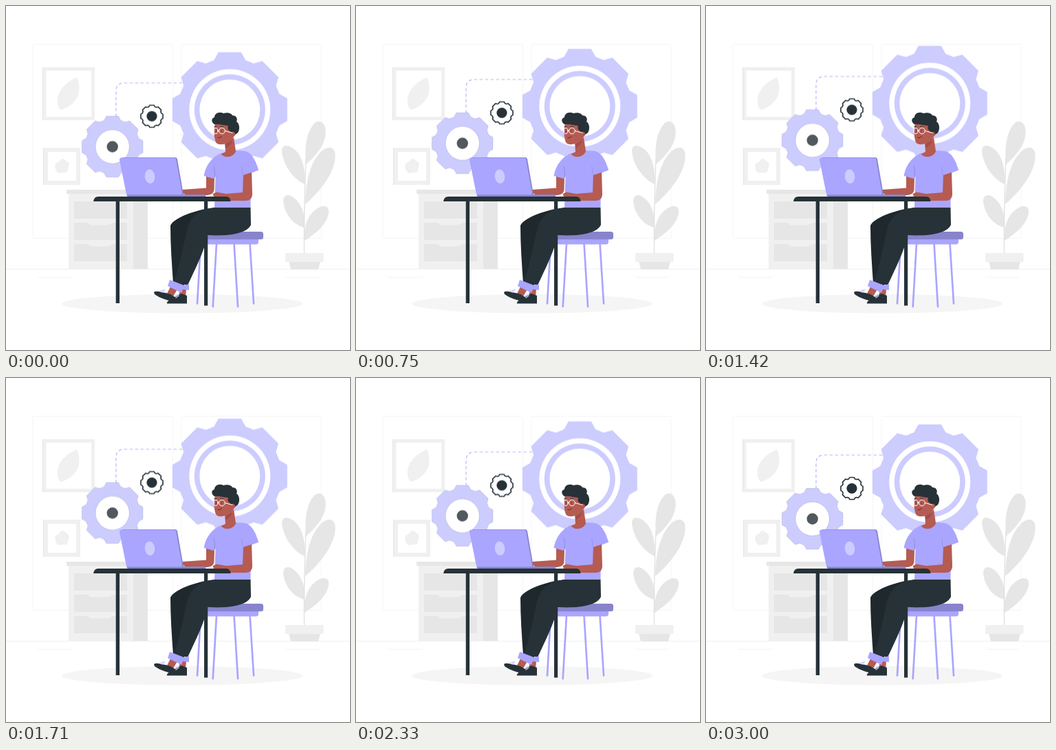
An HTML page that plays this animation: 500x500 px, repeating every 3040 ms.

```html
<!DOCTYPE html>
<html lang="en">
<head>
<meta charset="utf-8">
<title>Working at a desk</title>
<style>
  html, body { margin: 0; width: 100%; height: 100%; overflow: hidden; background: #fff; }
  svg { display: block; width: 100vw; height: 100vh; }
  .main { fill: #aaa5ff; }
  .deep { fill: #8884cc; }
  .pale { fill: #ccccff; }
  .dark { fill: #263238; }
  .skin { fill: #b55b52; }
  .g1 { fill: #f5f5f5; }
  .g2 { fill: #f0f0f0; }
  .g3 { fill: #e6e6e6; }
  .white { fill: #fff; }
  .line { fill: none; stroke-linecap: round; stroke-linejoin: round; }
</style>
</head>
<body>
<svg viewBox="0 0 500 500">
  <!-- room -->
  <g class="line" stroke="#f5f5f5">
    <rect x="39" y="55.5" width="203.5" height="282" rx="2"/>
    <rect x="255" y="55.5" width="203" height="282" rx="2"/>
    <path d="M0 382.5H500" stroke="#ebebeb" stroke-width=".7"/>
    <path d="M47 394.3H96M407 394.3H455" stroke="#efefef" stroke-width=".8"/>
  </g>
  <ellipse class="g1" cx="256" cy="432.7" rx="175" ry="13.8"/>

  <!-- pictures -->
  <path class="g3" d="M53 89H56V166H53ZM54 206H57V260H54Z"/>
  <path class="g2" d="M54 89H129V166H54ZM55 206H108V260H55Z"/>
  <path class="white" d="M58.500 94H124V161H58.500ZM61 212H102V254H61Z"/>
  <path class="g2" d="M103 104C90 109 77 120 75 134C74 142 76 148 80 151C91 148 104 138 106 125C107 117 106 109 103 104Z"/>
  <path class="g2" d="M80 223Q82 221 85 223L90 227Q93 230 91 233L90 239Q88 243 84 242L77 243Q73 241 72 237L71 232Q72 228 76 227Z"/>

  <!-- cabinet -->
  <path class="g2" d="M91 272H185V382H91Z"/>
  <path class="g3" d="M88 267H206V273H88ZM185 272H206V382H185Z"/>
  <g id="drawers" class="g3"></g>

  <!-- plant -->
  <g class="g3">
    <path d="M436 230C434 207 436 184 448 171C453 166 461 166 464 177C468 196 453 216 436 230Z"/>
    <path d="M435 288C435 261 441 230 455 215C463 205 474 202 478 212C482 230 467 261 435 288Z"/>
    <path d="M434 259C418 252 402 231 401 210C402 201 409 202 416 206C430 214 436 238 434 259Z"/>
    <path d="M434 322C419 319 405 304 403 284C403 275 409 273 416 277C429 285 436 304 434 322Z"/>
    <path d="M433 342C432 320 440 300 455 293C463 289 470 291 469 300C467 317 451 330 433 342Z"/>
    <path d="M411 371H457L454 383H414Z"/>
  </g>
  <path class="line" stroke="#e0e0e0" stroke-width="1.300" d="M433.500 359C433 320 434 270 436 222"/>
  <rect class="g2" x="406" y="359" width="55.500" height="13" rx="1"/>

  <!-- floating gears -->
  <g id="gears">
    <path class="line" style="stroke-linecap:butt" stroke="#b9b4f5" stroke-width="1.200" stroke-dasharray="4.500 3.500"
      d="M160 161V124Q160 112 172 112H259"/>
    <g transform="translate(325.300 151)">
      <path class="pale" data-gear="1"/>
      <circle class="white" r="59"/>
      <circle class="pale" r="51.500"/>
      <circle class="white" r="44"/>
    </g>
    <g transform="translate(154.700 204.700)">
      <g stroke="#263238" stroke-opacity=".4" stroke-width=".6" stroke-dasharray="1.500 1.500">
        <path class="pale" data-gear=".531"/>
        <circle class="white" r="24.500"/>
      </g>
      <circle fill="#51595e" r="8.200"/>
    </g>
    <g transform="translate(212 160.500)">
      <path class="white" data-gear=".192" stroke="#263238" stroke-width="1.600" stroke-linejoin="round"/>
      <circle class="dark" r="7.600"/>
    </g>
  </g>

  <!-- stool -->
  <path class="line" stroke="#aaa5ff" stroke-width="2.700" d="M283 345L278 432.500M306 345L300.700 437M331.500 345L337 437M354.500 345L360 432.500"/>
  <path class="main" d="M280 338H367V343Q367 346.500 363 346.500H284Q280 346.500 280 343Z"/>
  <rect class="deep" x="280" y="328" width="94" height="11.300" rx="3.500"/>

  <!-- feet -->
  <path class="skin" d="M239 408L249 412L243 422L234 418ZM253 411L262 412L261 423L251 423Z"/>
  <path class="dark" d="M215 416C218 413 226 416 232 417L239 419L249 425L246 430C235 428 224 425 216 419Z"/>
  <path class="dark" d="M234 431C236 427 243 425 249 421L255 418L263 421V432.500H236Q233 432.500 234 431Z"/>
  <path class="line" stroke="#ccccff" stroke-width="1.300" d="M225 414L229 413M227 416L231 412M246 421L250 419M247 424L251 421"/>

  <!-- trousers -->
  <path fill="#1e282d" d="M303 293C275 296 244 308 239 319C239 347 241 375 243 403L258 408L278 350L312 310Z"/>
  <path class="dark" d="M303 293H355.500L356 318C351 330 326 335 293 333C289 355 275 382 264 406L244 401C252 380 258 346 263 325C266 312 274 303 285 297Z"/>
  <path class="main" d="M238 398L259 406L266 404V413L257 412L255 417L235 407Z"/>

  <!-- torso and arms -->
  <path class="skin" d="M291 247L303 249L302.500 267C302 273 297 275 290 275H263L256 272V267L291 264.500Z"/>
  <path class="main" d="M313 214C301 218 290 231 287.700 247L302.500 251L304.500 247L303 293H355.500L356 243L367 238.500C362 222 356 211 344 210.500L333 210C329 219 319 220 313 214Z"/>
  <path class="skin" d="M345 243L357 240L358 273C358 280 354 283 348 283H322L302 277L300.500 273L306 270.500L320 273L344 271Z"/>
  <path class="line" stroke="#8884cc" stroke-width=".8" d="M303 250C304 241 303 237 302 233M344.500 246L343 234"/>
  <path class="main" d="M343 231L362 225L367 238.500L344.500 246Z"/>

  <!-- head -->
  <path class="skin" d="M318 199L331 191L334 211C331 220 318 222 312.500 215L319 212Z"/>
  <path fill="#a34d45" d="M319 201L329 195C327 201 324 204 319.500 206Z"/>
  <path class="skin" d="M304 170C302 180 302 191 305 198C308 203 319 202 326 196L336 184L331 168L310 165Z"/>
  <path class="dark" d="M303 172C298 169 298 163 303 162C303 156 310 153 316 156C322 154 328 156 329 159C335 159 337 164 335 168C340 171 340 180 337 184C335 187 331 186 328 187L326 182C322 180 322 177 323 174C317 174 309 171 303 172Z"/>
  <circle class="skin" cx="329.500" cy="186" r="3.300"/>
  <g class="line" stroke="#fff" stroke-width="1">
    <circle cx="314" cy="181.500" r="4.400"/>
    <ellipse cx="305" cy="181.500" rx="3" ry="4.200"/>
    <path d="M308 181H309.600M318.400 181.500L329 184.500"/>
  </g>
  <path class="line" stroke="#263238" stroke-width=".9" d="M303 175.500L306 175M311.500 175L316 175.500M313 181V182.500M305.500 181V182.500M308 191.500Q311 192.500 313.500 189.500"/>

  <!-- laptop -->
  <path class="deep" d="M175 274H289Q291 275 290 277.500H177Z"/>
  <path class="deep" d="M169 220H246Q248.500 220 249 222.500L258 274.500H180Z"/>
  <path class="main" d="M168 220.500H244.500Q246.700 220.500 247.200 223L256 272Q256 274.500 253.500 274.500H178Q175.200 274.500 174.700 272L165 224Q164.500 220.500 168 220.500Z"/>
  <ellipse class="pale" cx="209" cy="247.700" rx="7.300" ry="10.300" transform="rotate(-6 209 247.700)"/>

  <!-- table -->
  <path class="dark" d="M127 284Q128 277 134 277H320Q326 277 326.500 284ZM159.700 283H165V432H159.700ZM288 283H293.200V435.500H288Z"/>
</svg>
<script>
  const LOOP = 3040, START = 40, RISE = 10;

  // one tooth: angle in degrees, radius
  const TOOTH = [[-11.2, 85.1], [11.2, 85.1], [17.7, 75.6], [27.3, 75.6]];

  function gearPath(scale) {
    const points = [];
    for (let turn = 0; turn < 360; turn += 45) {
      for (const [angle, radius] of TOOTH) {
        const a = (turn + angle) * Math.PI / 180, r = radius * scale;
        points.push(`${(r * Math.sin(a)).toFixed(2)} ${(-r * Math.cos(a)).toFixed(2)}`);
      }
    }
    return `M${points.join('L')}Z`;
  }

  for (const gear of document.querySelectorAll('[data-gear]')) {
    gear.setAttribute('d', gearPath(+gear.dataset.gear));
  }

  document.getElementById('drawers').innerHTML = [284, 315, 346].map((y, i) =>
    `<path d="M99 ${y}H176V${y + 25}H99Z"/>` +
    (i ? `<path class="g2" d="M119 ${y}H156L148 ${y + 3.5}H122Z"/>` : '')
  ).join('');

  const shift = y => ({ transform: `translateY(${y}px)` });
  document.getElementById('gears').animate(
    [shift(0), shift(-RISE), shift(0)],
    { duration: LOOP, iterations: Infinity, iterationStart: START / LOOP }
  );
</script>
</body>
</html>
```
